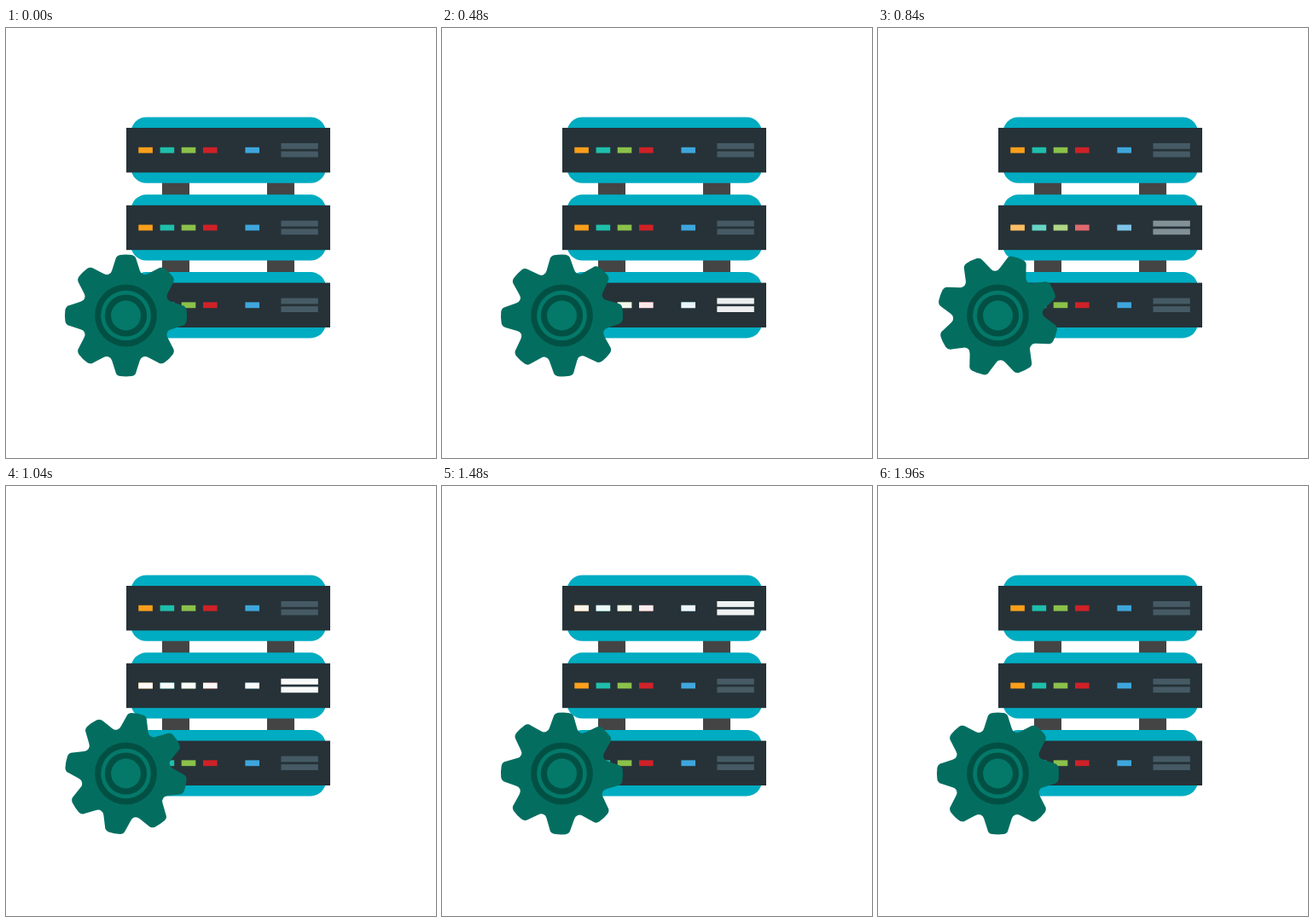
Write an HTML page that moves like this. It is 504 by 504 pixels and loops after 2000 ms.

```html
<!DOCTYPE html>
<html lang="en">
<head>
<meta charset="utf-8">
<title>Server rack</title>
<style>
  html, body { margin: 0; width: 100%; height: 100%; overflow: hidden; background: #fff; }
  svg { display: block; width: 504px; height: 504px; }
</style>
</head>
<body>
<svg id="stage" viewBox="0 0 504 504"></svg>
<script>
const NS = 'http://www.w3.org/2000/svg';
const stage = document.getElementById('stage');

function add(parent, tag, attrs) {
  const el = document.createElementNS(NS, tag);
  for (const key in attrs) el.setAttribute(key, attrs[key]);
  return parent.appendChild(el);
}
const rect = (parent, x, y, width, height, fill, rx = 0) =>
  add(parent, 'rect', { x, y, width, height, fill, rx });

const LEDS = [[155.3, '#fb9f1b'], [180.6, '#1ebfab'], [205.7, '#8bc14a'], [231, '#cf2127'], [280.4, '#3ea6dc']];
const PITCH = 90.8;

// Draws one unit and returns the white overlay of its lights.
function addServer(i) {
  const g = add(stage, 'g', { transform: `translate(0 ${i * PITCH})` });
  rect(g, 146.5, 104.5, 228.5, 77.3, '#00acc1', 18);
  rect(g, 141, 117, 239, 52.4, '#263238');
  const lights = (parent, white) => {
    for (const [x, color] of LEDS) rect(parent, x, 139.8, 16.6, 6.8, white || color);
    for (const y of [135, 144.6]) rect(parent, 322.4, y, 43.4, 6.8, white || '#455a64');
  };
  lights(g);
  const glow = add(g, 'g', { opacity: 0 });
  lights(glow, '#fff');
  return glow;
}

function gearPath() {
  const R = Math.PI / 180;
  let d = '';
  for (let tooth = 0; tooth < 360; tooth += 45) {
    const p = (a, r) => {
      const t = (tooth + a) * R;
      return `${(r * Math.sin(t)).toFixed(2)} ${(-r * Math.cos(t)).toFixed(2)}`;
    };
    d += `${d ? 'L' : 'M'}${p(-17, 55.5)} L${p(-10.4, 67)} Q${p(-9.2, 71)} ${p(-5.5, 71.4)}` +
      `Q${p(0, 72)} ${p(5.5, 71.4)} Q${p(9.2, 71)} ${p(10.4, 67)}` +
      `L${p(17, 55.5)} Q${p(19, 52.4)} ${p(22.5, 52.4)} Q${p(26, 52.4)} ${p(28, 55.5)}`;
  }
  return d + 'Z';
}

for (const y of [180, 271])
  for (const x of [183, 306]) rect(stage, x, y, 32, 17, '#444');

const glows = [0, 1, 2].map(addServer);
const hub = add(stage, 'g', { transform: 'translate(140.5 337)' });
const gear = add(hub, 'path', { d: gearPath(), fill: '#036e60' });
for (const [r, fill] of [[36.4, '#025044'], [29.3, '#04796a'], [24.6, '#025044'], [17.4, '#04796a']])
  add(hub, 'circle', { r, fill });

const LOOP = 2000, STEP = 40;
const PEAKS = [1555, 1090, 395];  // top, middle, bottom
const HALF = 410;

function pulse(t, peak) {
  const d = Math.abs(t - peak) / HALF;
  return d < 1 ? 0.5 + 0.5 * Math.cos(Math.PI * d) : 0;
}

function draw(now) {
  const step = Math.floor((now % LOOP) / STEP);
  // The last step completes the full turn.
  gear.setAttribute('transform', `rotate(${step * 360 / (LOOP / STEP - 1)})`);
  glows.forEach((g, i) => g.setAttribute('opacity', pulse(step * STEP, PEAKS[i]).toFixed(3)));
}

const start = performance.now();
function tick() {
  draw(performance.now() - start);
  requestAnimationFrame(tick);
}
tick();
</script>
</body>
</html>
```
